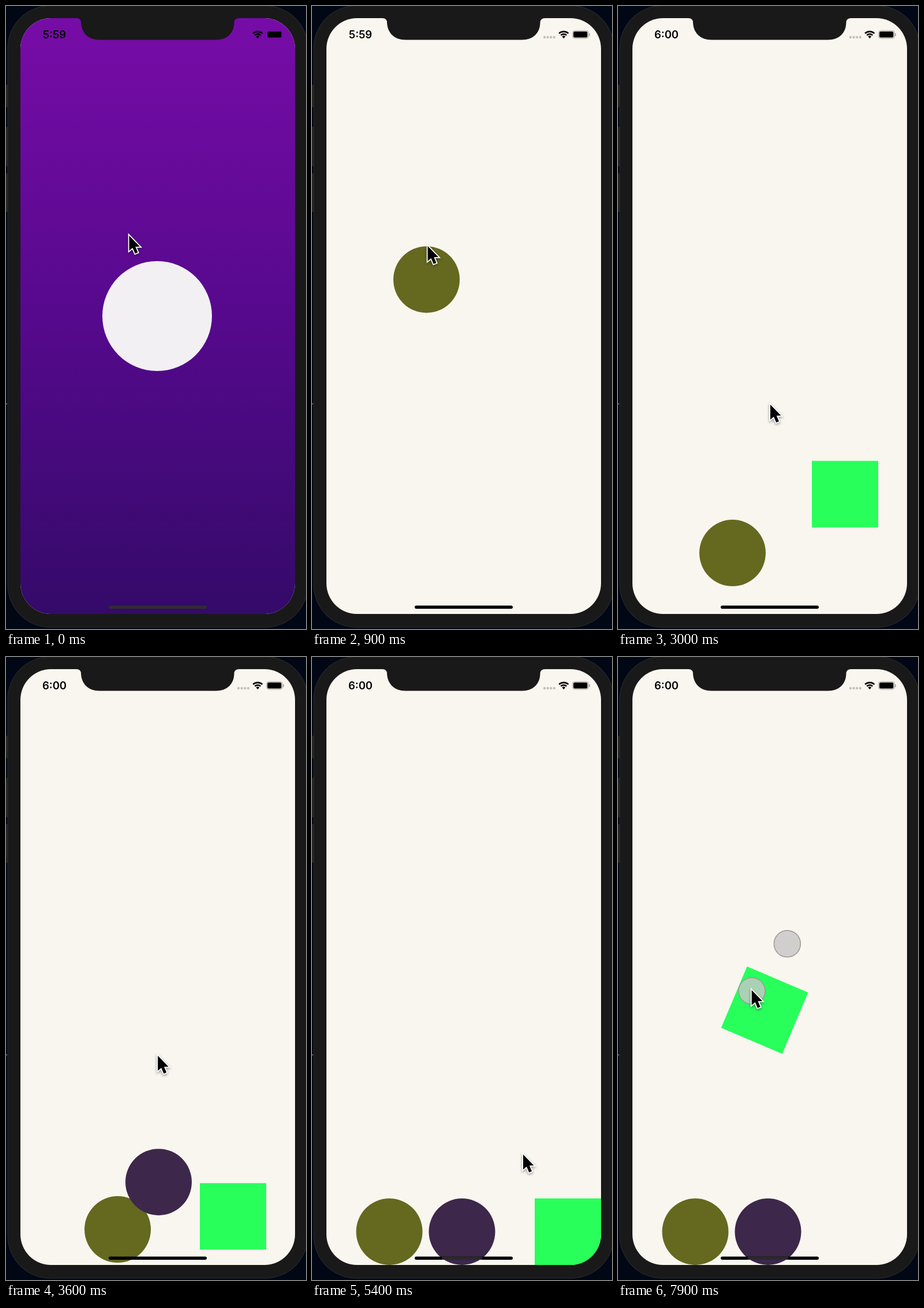
Recreate the animation shown at these times as an HTML page with a canvas. Size 520 by 1077 pixels, loop 8000 ms.

```html
<!DOCTYPE html>
<html lang="en">
<head>
<meta charset="utf-8">
<title>Falling shapes</title>
<style>
  html, body { margin: 0; width: 100%; height: 100%; overflow: hidden; background: #020716; }
  canvas { display: block; width: 520px; height: 1077px; }
</style>
</head>
<body>
<canvas id="stage" width="520" height="1077"></canvas>
<script>
const ctx = document.getElementById('stage').getContext('2d');
const LOOP = 8, STEP = 0.1;
const GRAVITY = 1270, BOUNCE = 0.55, FLOOR = 993.5, HALF = 57.5;
const CENTER = { x: 262.7, y: 536.5 };
const CREAM = '#f9f6ef', OLIVE = '#65681f', GREEN = '#28ff5b', PLUM = '#3d274a';

const clamp = v => Math.min(1, Math.max(0, v));
const mix = (a, b, k) => a + (b - a) * k;
const progress = (t, from, to) => clamp((t - from) / (to - from));

// Smooth interpolation through [time, ...values] keys.
function track(t, keys) {
  const i = keys.findIndex(key => key[0] > t);
  if (i === 0) return keys[0].slice(1);
  if (i < 0) return keys[keys.length - 1].slice(1);
  const a = keys[i - 1], b = keys[i];
  const k = progress(t, a[0], b[0]), s = k * k * (3 - 2 * k);
  return a.slice(1).map((v, n) => mix(v, b[n + 1], s));
}

// Height above the floor, tau seconds after leaving it at speed v.
function hop(tau, v) {
  while (v > 15) {
    const flight = 2 * v / GRAVITY;
    if (tau < flight) return v * tau - GRAVITY * tau * tau / 2;
    tau -= flight;
    v *= BOUNCE;
  }
  return 0;
}

function dropY(t, start, y) {
  const fall = Math.sqrt(2 * (FLOOR - y) / GRAVITY), tau = t - start;
  return tau < fall ? y + GRAVITY * tau * tau / 2
                    : FLOOR - hop(tau - fall, GRAVITY * fall * BOUNCE);
}

function disc(x, y, r, fill, stroke) {
  ctx.beginPath();
  ctx.arc(x, y, r, 0, 2 * Math.PI);
  ctx.fillStyle = fill;
  ctx.fill();
  if (stroke) {
    ctx.strokeStyle = stroke;
    ctx.lineWidth = 1.5;
    ctx.stroke();
  }
}

function pill(x, y, w, h, r, fill) {
  ctx.beginPath();
  ctx.roundRect(x, y, w, h, r);
  ctx.fillStyle = fill;
  ctx.fill();
}

const cursorKeys = [
  [0, 213.5, 397], [0.765, 198, 455], [0.9, 200.5, 415], [1.65, 393, 498],
  [1.8, 428, 523], [3, 264, 689], [3.5, 264, 689], [4.3, 245, 694], [4.5, 245, 694],
  [5, 262, 495], [5.4, 366, 860], [5.65, 459, 996], [6.2, 267, 618]
];
const touchKeys = [ // time, angle in degrees, distance from the centre
  [6.3, 87, 88], [7.2, 121, 48], [7.55, 155, 50], [7.9, 127, 51]
];

function touchAt(t) {
  const [degrees, radius] = track(t, touchKeys), a = degrees * Math.PI / 180;
  return { degrees, dx: radius * Math.cos(a), dy: radius * Math.sin(a) };
}

function cursorAt(t) {
  if (t < 6.25) return track(t, cursorKeys);
  const { dx, dy } = touchAt(t);
  return [CENTER.x + dx - 0.3, mix(CENTER.y + dy - 6.5, CENTER.y + dy - 1.5, progress(t, 6.3, 7.2))];
}

function drawOlive(t) {
  if (t < 0.765) return;
  const x = t < 3.58 ? 198.5 : 134 + 64.5 * Math.exp((3.58 - t) / 0.25);
  disc(x, dropY(t, 0.765, 461.4), HALF, OLIVE);
}

function drawPlum(t) {
  if (t < 3.02) return;
  const [x] = track(t, [[3.58, 264], [3.85, 295], [4.3, 301], [4.6, 318], [5.4, 260]]);
  const hit = 700 + GRAVITY * 0.56 ** 2 / 2;
  const y = t < 3.58 ? 700 + GRAVITY * (t - 3.02) ** 2 / 2
          : t < 3.8 ? mix(hit, FLOOR, progress(t, 3.58, 3.8))
          : FLOOR - hop(t - 3.8, 368);
  disc(x, y, HALF, PLUM);
}

function drawSquare(t) {
  if (t < 1.65) return;
  let x = 393.5, y = dropY(t, 1.65, 498), degrees = 0;
  if (t >= 3.64) {
    x += 50 * (1 - Math.exp((3.64 - t) / 0.2));
    y = mix(y, FLOOR, progress(t, 3.64, 4.2));
    degrees = -0.9 * progress(t, 3.6, 3.9) * (1 - progress(t, 4.3, 4.5));
  }
  if (t >= 5.65) {
    const [cx, cy] = track(t, cursorKeys);
    const pinch = progress(t, 6.4, 7.2);
    x = cx - 15.3 + 2.5 * pinch;
    y = cy - 2.5 - 5 * pinch;
    degrees = Math.max(0, touchAt(t).degrees - 104);
  }
  ctx.save();
  ctx.translate(x, y);
  ctx.rotate(degrees * Math.PI / 180);
  ctx.fillStyle = GREEN;
  ctx.fillRect(-HALF, -HALF, 2 * HALF, 2 * HALF);
  ctx.restore();
}

function drawTouches(t) {
  if (t < 6.2) return;
  const { dx, dy } = touchAt(t);
  for (const side of [1, -1])
    disc(CENTER.x + side * dx, CENTER.y + side * dy, 23, 'rgba(199,199,199,.82)', '#9c9899');
}

function drawSplash(alpha) {
  if (!alpha) return;
  const sky = ctx.createLinearGradient(0, 21, 0, 1051);
  ['#770ca7', '#56098d', '#340a69'].forEach((color, i) => sky.addColorStop(i / 2, color));
  ctx.globalAlpha = alpha;
  ctx.fillStyle = sky;
  ctx.fillRect(25, 21, 476, 1030);
  disc(262, 536, 95, '#f2f0f3');
  ctx.globalAlpha = 1;
}

function drawStatus(t, splash) {
  ctx.fillStyle = '#000';
  ctx.font = '600 18.5px Inter, sans-serif';
  ctx.textAlign = 'center';
  ctx.fillText(t < 2.3 ? '5:59' : '6:00', 84, 56);

  ctx.globalAlpha = 1 - splash;
  for (let i = 0; i < 4; i++) disc(403 + i * 5.6, 54, 2.2, '#c4c2be');
  ctx.strokeStyle = '#a5a39f';
  ctx.lineWidth = 1;
  ctx.beginPath();
  ctx.roundRect(451.5, 42.5, 28, 13.5, 4);
  ctx.stroke();
  pill(480.3, 47, 1.5, 5, 1, '#a5a39f');
  ctx.globalAlpha = 1;
  pill(453, 44, 24.5, 10.5, 2.5, '#000');

  ctx.strokeStyle = '#000';
  ctx.lineWidth = 2.6;
  for (const r of [7, 11.4]) {
    ctx.beginPath();
    ctx.arc(436.3, 55.5, r, -Math.PI * 0.75, -Math.PI * 0.25);
    ctx.stroke();
  }
  ctx.beginPath();
  ctx.moveTo(436.3, 56);
  ctx.arc(436.3, 55.5, 4, -Math.PI * 0.75, -Math.PI * 0.25);
  ctx.fillStyle = '#000';
  ctx.fill();
}

function drawHomeBar(t, splash) {
  const shade = 46 * splash;
  pill(178, 1036.5, 170, 5.5, 2.75, `rgb(${shade},${shade},${shade})`);
  if (t > 5) {
    ctx.fillStyle = '#2a292b';
    ctx.fillRect(225, 1036.5, 70, 5.5);
  }
}

function drawNotch() {
  ctx.beginPath();
  ctx.moveTo(122, 20);
  ctx.lineTo(122, 21);
  ctx.quadraticCurveTo(130, 21, 130, 29);
  ctx.bezierCurveTo(131, 47, 143, 58.5, 162, 58.5);
  ctx.lineTo(364, 58.5);
  ctx.bezierCurveTo(383, 58.5, 395, 47, 395.5, 29);
  ctx.quadraticCurveTo(395.5, 21, 404, 21);
  ctx.lineTo(404, 20);
  ctx.fillStyle = '#191919';
  ctx.fill();
}

function drawPhone() {
  ctx.fillStyle = '#020716';
  ctx.fillRect(0, 0, 520, 1077);
  for (const [y, h] of [[136, 39], [209, 68], [289, 67]]) pill(0, y, 6, h, 0, '#232323');
  pill(0, 687, 2, 1.5, 0, '#7d8394');
  pill(2.5, -1, 521, 1075.5, 74, '#2b2c2e');
  pill(3.5, 0, 519, 1073.5, 73, '#191919');
}

function drawCursor(t) {
  const [x, y] = cursorAt(t);
  ctx.save();
  ctx.translate(x, y);
  ctx.beginPath();
  [[0, 0], [0, 26], [6, 21], [10.3, 31], [15, 29], [10.8, 19.2], [18.5, 19]]
    .forEach(p => ctx.lineTo(...p));
  ctx.closePath();
  ctx.shadowColor = 'rgba(0,0,0,.4)';
  ctx.shadowBlur = 4;
  ctx.shadowOffsetY = 2;
  ctx.strokeStyle = '#fff';
  ctx.lineWidth = 3.6;
  ctx.stroke();
  ctx.shadowColor = 'transparent';
  ctx.fillStyle = '#000';
  ctx.fill();
  ctx.restore();
}

function draw(t) {
  const splash = 1 - progress(t, 0.05, 0.4);
  drawPhone();
  ctx.save();
  ctx.beginPath();
  ctx.roundRect(25, 21, 476, 1030, 53);
  ctx.clip();
  ctx.fillStyle = CREAM;
  ctx.fillRect(25, 21, 476, 1030);
  drawOlive(t);
  drawSquare(t);
  drawPlum(t);
  drawSplash(splash);
  drawStatus(t, splash);
  drawHomeBar(t, splash);
  ctx.restore();
  drawNotch();
  drawTouches(t);
  drawCursor(t);
}

const origin = performance.now();
function frame() {
  const t = (performance.now() - origin) / 1000 % LOOP;
  draw(Math.floor(t / STEP + 1e-6) * STEP);
  requestAnimationFrame(frame);
}
frame();
</script>
</body>
</html>
```
